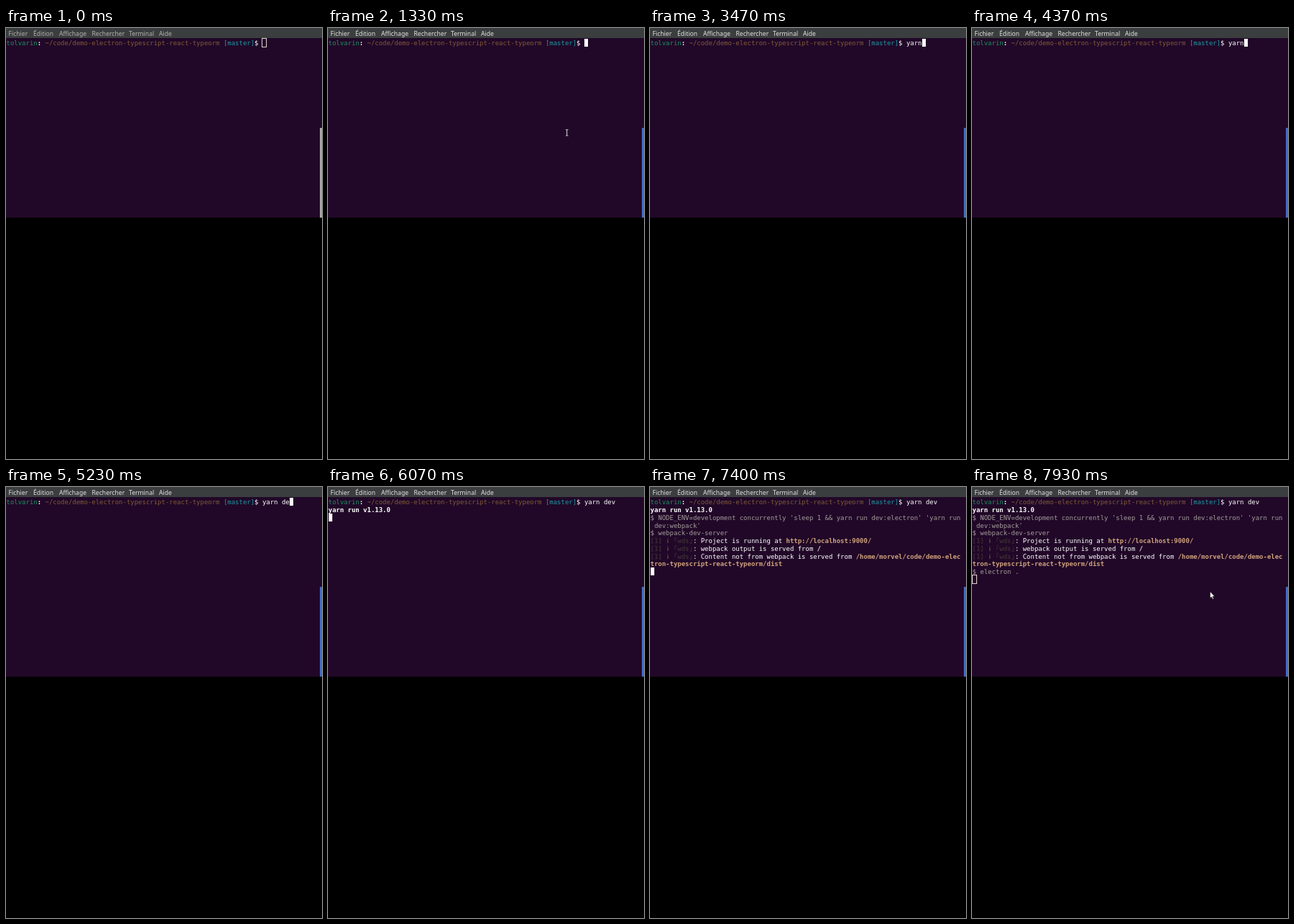
Animation of 440 by 600 pixels, one loop 8000 ms. Source, as an HTML page:

```html
<!DOCTYPE html>
<html lang="fr">
<head>
<meta charset="utf-8">
<style>
html, body { margin: 0; width: 100%; height: 100%; overflow: hidden; background: #000; }
#stage { position: relative; width: 440px; height: 600px; overflow: hidden; background: #000; }
#stage > *, .row, #menu span { position: absolute; }
#menu { left: 0; top: 0; width: 440px; height: 14px; background: #3a3e3e; font: 8.6px/14px "Noto Sans", "Open Sans", sans-serif; }
#menu span { top: .5px; }
#term { left: 0; top: 14px; width: 440px; height: 250px; background: #210828; }
#bar { left: 437px; top: 139px; width: 3px; height: 125px; }
.row { left: .5px; font: 8.97px/11px "DejaVu Sans Mono", monospace; white-space: pre; color: #fff; }
.user { color: #1f8f62; }
.path { color: #825a38; }
.git { color: #1c9aa6; }
.cmd { color: #a39d9b; }
.dim { color: #453a38; }
.info { color: #8c7468; }
.url { color: #d0a27c; font-weight: bold; }
.cell { display: inline-block; width: 1ch; text-align: center; }
#caret { box-sizing: border-box; }
</style>
</head>
<body>
<div id="stage">
  <div id="menu"></div>
  <div id="term"></div>
  <div id="bar"></div>
  <div id="caret"></div>
  <div id="rows"></div>
  <svg id="beam" width="6" height="10" style="left:330px;top:141px"><path d="M1 .5h1.2l.5.5.5-.5h1.2M2.7 1v7.5M1 9h1.2l.5-.5.5.5h1.2" fill="none" stroke="#e4e0e0"/></svg>
  <svg id="arrow" width="9" height="13" style="left:331px;top:145px"><path d="M.5.5v9.3l2.1-1.9 1.5 3.4 1.5-.7-1.5-3.3h2.8z" fill="#fff" stroke="#0c0410" stroke-width=".6"/></svg>
</div>
<script>
const $ = id => document.getElementById(id);
const span = (cls, text) => `<span class="${cls}">${text}</span>`;
const LOOP = 8000, CHAR = 5.4, LINE = 10.77, PROMPT = 66;
const FOCUS = 1130, ENTER = 5900, BLUR = 7830;

const labels = [["Fichier", 3.5], ["Édition", 38], ["Affichage", 74], ["Rechercher", 119.5], ["Terminal", 171], ["Aide", 213]];
$("menu").innerHTML = labels.map(([s, x]) => `<span style="left:${x}px">${s}</span>`).join("");

const wds = span("dim", "[1] ") + span("info cell", "ℹ") + " " +
  span("dim", span("cell", "｢") + "wds" + span("cell", "｣")) + ": ";

// [time of appearance, content]
const lines = [
  [0, span("user", "tolvarin") + "<b>:</b> " + span("path", "~/code/demo-electron-typescript-react-typeorm") +
    " " + span("git", "[master]") + '$ <span id="typed"></span>'],
  [6040, "<b>yarn run v1.13.0</b>"],
  [6240, span("cmd", "$ NODE_ENV=development concurrently 'sleep 1 &amp;&amp; yarn run dev:electron' 'yarn run")],
  [6240, span("cmd", " dev:webpack'")],
  [6530, span("cmd", "$ webpack-dev-server")],
  [7330, wds + "Project is running at " + span("url", "http://localhost:9000/")],
  [7330, wds + "webpack output is served from /"],
  [7330, wds + "Content not from webpack is served from " + span("url", "/home/morvel/code/demo-elec")],
  [7330, span("url", "tron-typescript-react-typeorm/dist")],
  [7600, span("cmd", "$ electron .")]
];
$("rows").innerHTML = lines.map(([, s], i) => `<div class="row" style="top:${16.2 + i * LINE}px">${s}</div>`).join("");
const rows = [...$("rows").children];

const command = "yarn dev", keys = [2400, 2530, 2670, 2800, 4930, 5070, 5200, 5370];
const blinks = [[1730, 2400], [3730, 4330], [6500, 7070], [7670, BLUR]];
const within = (t, [a, b]) => t >= a && t < b;
const show = (el, on) => el.style.visibility = on ? "visible" : "hidden";

function draw(t) {
  const focused = t >= FOCUS;
  $("menu").style.color = focused ? "#e4e2e0" : "#b4b2b0";
  $("bar").style.background = focused ? "#3f6cc4" : "#a8a4a2";

  const typed = keys.filter(k => t >= k).length;
  $("typed").textContent = command.slice(0, typed);
  rows.forEach((row, i) => show(row, t >= lines[i][0]));

  const shown = lines.filter(([at]) => t >= at).length;
  const row = t < ENTER ? 0 : shown, col = t < ENTER ? PROMPT + typed : 0;
  const solid = focused && t < BLUR, caret = $("caret").style;
  caret.left = Math.round(col * CHAR + (solid ? .6 : -.5)) + "px";
  caret.top = Math.round((solid ? 15 : 14) + row * LINE) + "px";
  caret.width = solid ? "5px" : "7px";
  caret.height = solid ? "11px" : "13px";
  caret.background = solid ? "#fff" : "none";
  caret.border = solid ? "none" : "1px solid #e0d4d0";
  show($("caret"), !blinks.some(b => within(t, b)));

  // the pointer glides in from the right edge and slows down
  const p = Math.min(1, Math.max(0, (t - 970) / 330)), rest = (1 - p) ** 2;
  $("beam").style.transform = `translate(${Math.round(108 * rest)}px, ${Math.round(120 * rest)}px)`;
  show($("beam"), within(t, [970, keys[0]]));
  show($("arrow"), t >= BLUR);
}

function tick() {
  draw(performance.now() % LOOP);
  requestAnimationFrame(tick);
}
tick();
</script>
</body>
</html>
```
